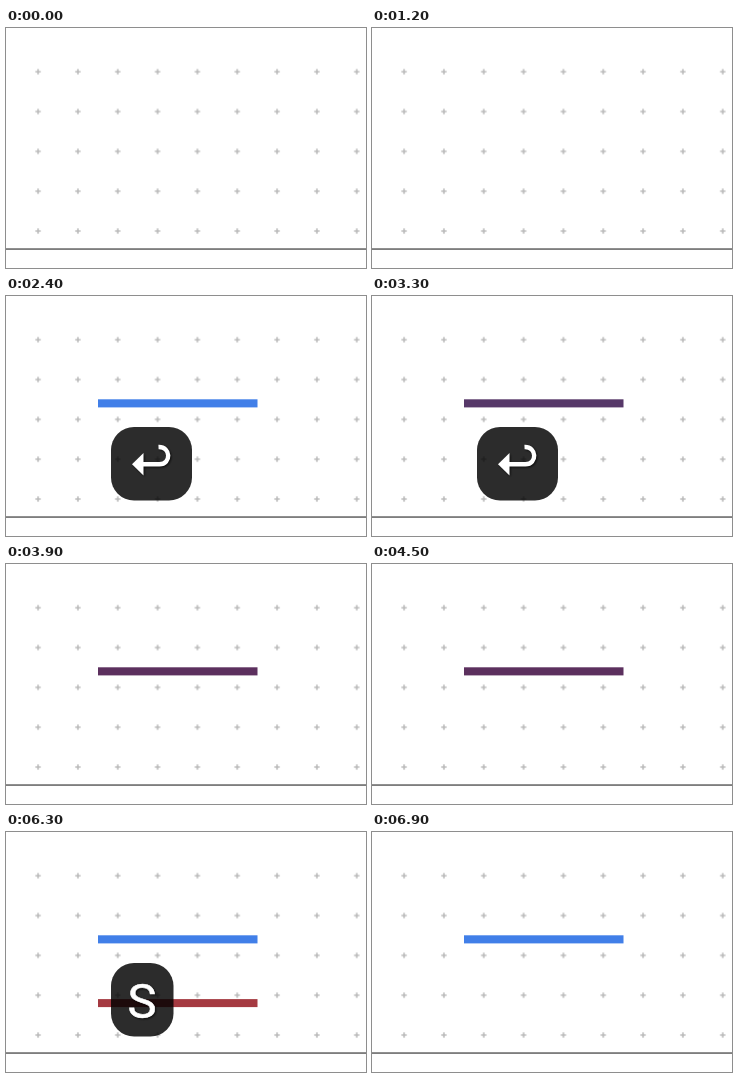
Animation, 360 px wide and 240 px high, one loop 7.2 s. Source, as an HTML page:

```html
<!DOCTYPE html>
<html lang="en">
<head>
<meta charset="utf-8">
<title>Line and keys</title>
<style>
html, body { margin: 0; width: 100%; height: 100%; overflow: hidden; background: #fff; }
svg { display: block; width: 360px; height: 240px; }

.bar, .copy, .key { animation: 7200ms step-end infinite; }
.bar { animation-name: bar; }
.copy { animation-name: copy; }
.enter { animation-name: enter; }
.letter { animation-name: letter; }
.key > rect { fill: #000; fill-opacity: .827; }
.glyph { filter: drop-shadow(1px 1.5px 1px rgba(0, 0, 0, .75)); }
text { font: 49px Roboto, "Open Sans", sans-serif; fill: #fff; stroke: #fff; stroke-width: .6; text-anchor: middle; }

@keyframes bar {
  0% { fill: #417fe8; opacity: 0; }
  8.3333% { fill: #417fe8; opacity: 1; }
  12.5% { fill: #417fe8; opacity: .5; }
  16.6667% { fill: #417fe8; opacity: 0; }
  29.1667% { fill: #417fe8; opacity: .6; }
  33.3333% { fill: #417fe8; opacity: 1; }
  45.8333% { fill: #573869; opacity: 1; }
  50% { fill: #5a3262; opacity: 1; }
  54.1667% { fill: #5c305e; opacity: 1; }
  66.6667% { fill: #544d8c; opacity: 1; }
  70.8333% { fill: #4a6abd; opacity: 1; }
  75%, 100% { fill: #417fe8; opacity: 1; }
}
@keyframes copy {
  0% { opacity: 0; }
  75% { opacity: .92; }
  79.1667% { opacity: 1; }
  91.6667% { opacity: .5; }
  95.8333%, 100% { opacity: 0; }
}
@keyframes enter {
  0% { opacity: 0; }
  33.3333% { opacity: 1; }
  54.1667%, 100% { opacity: 0; }
}
@keyframes letter {
  0% { opacity: 0; }
  75% { opacity: 1; }
  95.8333%, 100% { opacity: 0; }
}
</style>
</head>
<body>
<svg viewBox="0 0 360 240">
  <defs>
    <pattern id="grid" x="12.2" y="23.8" width="39.83" height="39.83" patternUnits="userSpaceOnUse">
      <path d="M17.1 19.9h5.6M19.9 17.1v5.6" stroke="#c6c6c6" stroke-width="1.7"/>
      <circle cx="19.9" cy="19.9" r="1.5" fill="#bebebe"/>
    </pattern>
  </defs>
  <rect width="360" height="240" fill="#fff"/>
  <rect x="12.2" y="23.8" width="360" height="196" fill="url(#grid)"/>
  <rect y="220.4" width="360" height="1.3" fill="#484848"/>

  <rect class="bar" x="92" y="103.3" width="159.5" height="8.1"/>
  <rect class="copy" x="92" y="167.1" width="159.5" height="8" fill="#a53a41"/>

  <g class="key enter">
    <rect x="105" y="131" width="81" height="73.5" rx="23"/>
    <g class="glyph">
      <path d="M152.5 151C165 150.5 165.5 168.3 153.5 168.3H136" fill="none" stroke="#fff" stroke-width="4.4"/>
      <path d="M126 168.3 137.5 157v22.6z" fill="#fff"/>
    </g>
  </g>
  <g class="key letter">
    <rect x="105" y="131" width="62.5" height="73.5" rx="23"/>
    <text class="glyph" x="136" y="186.3">S</text>
  </g>
</svg>
</body>
</html>
```
